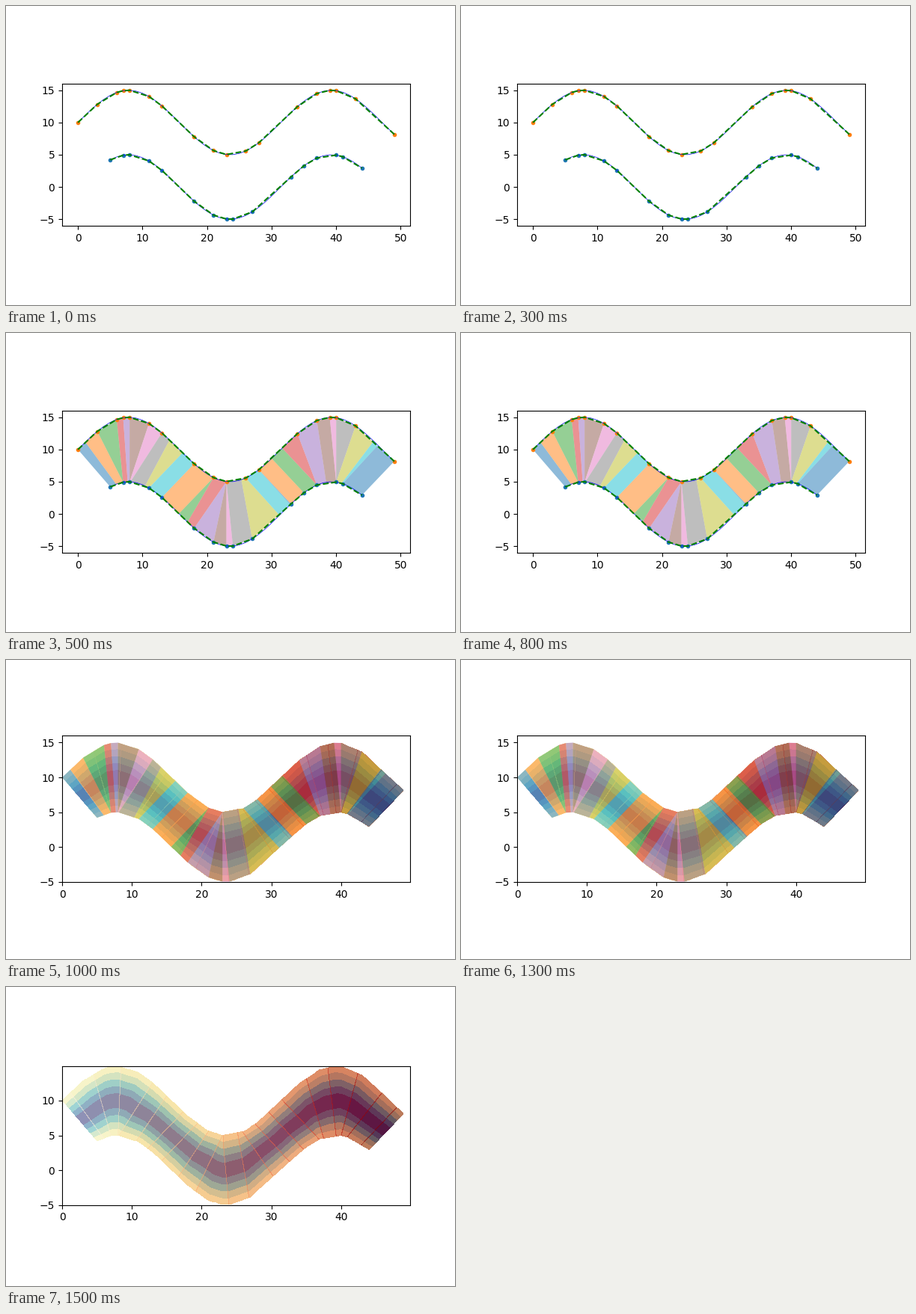
Animation of 600 by 400 pixels, one loop 2000 ms. Source, as a matplotlib script:

```python
import numpy as np
import matplotlib.pyplot as plt
from matplotlib.animation import FuncAnimation


def cross(a, b):
    return a[..., 0] * b[..., 1] - a[..., 1] * b[..., 0]


def wave(x, base):
    x = np.asarray(x, float)
    return np.column_stack([x, base + 5 * np.sin(x / 5)])


def arc_length(line):
    steps = np.hypot(*np.diff(line, axis=0).T)
    return np.concatenate([[0], np.cumsum(steps)])


def project(line, p):
    """Arc length of the point on the polyline nearest to p."""
    a, d = line[:-1], np.diff(line, axis=0)
    t = np.clip(((p - a) * d).sum(1) / (d * d).sum(1), 0, 1)
    k = np.argmin(np.hypot(*(a + t[:, None] * d - p).T))
    return arc_length(line)[k] + t[k] * np.hypot(*d[k])


def split(line, other):
    """Vertices of line plus the projected inner vertices of other, in order."""
    s = arc_length(line)
    cuts = np.sort(np.concatenate([s, [project(line, p) for p in other[1:-1]]]))
    return np.column_stack([np.interp(cuts, s, line[:, 0]),
                            np.interp(cuts, s, line[:, 1])])


top = wave([0, 3, 6, 7, 8, 11, 13, 18, 21, 23, 26, 28, 34, 37, 39, 40, 43, 49], 10)
bottom = wave([5, 7, 8, 11, 13, 18, 21, 23, 24, 27, 33, 35, 37, 40, 41, 44], 0)
upper, lower = split(top, bottom), split(bottom, top)
cells = [np.array([upper[i], upper[i + 1], lower[i + 1], lower[i]])
         for i in range(len(upper) - 1)]

# Position along and depth across the band, sampled on a regular grid.
xs = np.arange(500) * 0.1
ys = np.arange(200) * 0.1 - 5
grid = np.stack(np.meshgrid(xs, ys), axis=-1)
along = np.full(grid.shape[:2], np.nan)
depth = along.copy()
mid = arc_length((upper + lower) / 2)
mid /= mid[-1]

for i, (a, b, c, d) in enumerate(cells):
    inside = np.ones(along.shape, bool)
    for p, q in ((a, b), (b, c), (c, d), (d, a)):
        inside &= cross(q - p, grid - p) <= 1e-9
    pts = grid[inside]
    if not len(pts):
        continue
    lo, hi = np.zeros(len(pts)), np.ones(len(pts))
    for _ in range(30):
        s = (lo + hi) / 2
        start = a + s[:, None] * (b - a)
        span = d + s[:, None] * (c - d) - start
        right = cross(span, pts - start) > 0
        lo, hi = np.where(right, s, lo), np.where(right, hi, s)
    f = ((pts - start) * span).sum(1) / (span * span).sum(1)
    along[inside] = mid[i] + s * (mid[i + 1] - mid[i])
    depth[inside] = np.clip(1 - np.abs(2 * f - 1), 1e-6, 1 - 1e-6)

fig, ax = plt.subplots(figsize=(6, 4), dpi=100)
fig.subplots_adjust(left=0.125, right=0.9, bottom=0.125, top=0.88)


def draw_lines():
    for line, base, color in ((bottom, 0, "C0"), (top, 10, "C1")):
        ax.plot(*line.T, ".", color=color)
        smooth = wave(np.arange(line[0, 0], line[-1, 0] + 1), base)
        ax.plot(*smooth.T, "b-", lw=0.5)
        ax.plot(*line.T, "g--")


def draw_cells():
    for i, cell in enumerate(cells):
        ax.fill(*cell.T, facecolor=f"C{i % 10}", alpha=0.5)


def draw_bands():
    ax.contourf(xs, ys, depth, levels=np.linspace(0, 1, 6), cmap="YlGnBu")
    ax.contourf(xs, ys, along, levels=(np.arange(22) - 0.5) / 20,
                cmap="OrRd", alpha=0.5)


wide = (-2.45, 51.45, -6, 16)
scenes = [
    ((draw_lines,), wide),
    ((draw_cells, draw_lines), wide),
    ((draw_bands, draw_cells), (0, 49.9, -5, 16)),
    ((draw_bands,), (0, 49.9, -5, 14.9)),
]


def update(frame):
    ax.cla()
    layers, (x0, x1, y0, y1) = scenes[frame]
    for layer in layers:
        layer()
    ax.set_aspect("equal")
    ax.set_xticks([x for x in range(0, 51, 10) if x0 <= x <= x1])
    ax.set_yticks([y for y in range(-5, 16, 5) if y0 <= y <= y1])
    ax.set_xlim(x0, x1)
    ax.set_ylim(y0, y1)


anim = FuncAnimation(fig, update, frames=len(scenes), interval=500,
                     init_func=lambda: None, repeat=True, repeat_delay=0)
plt.show()
```
